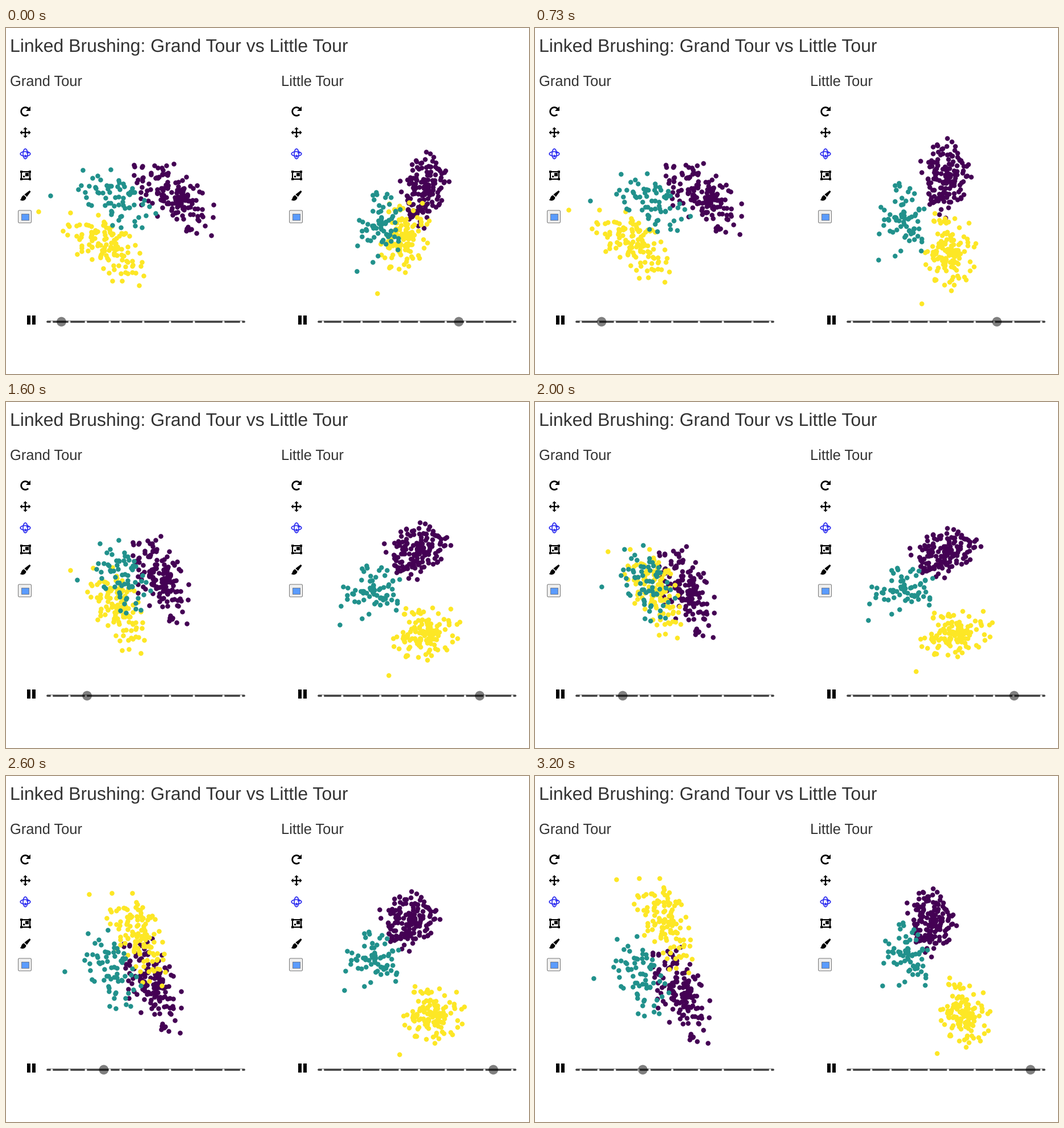
Write a matplotlib script that moves like this. It is 920x609 px and loops after 3270 ms.

```python
import numpy as np
import matplotlib.pyplot as plt
from matplotlib.animation import FuncAnimation
from matplotlib.patches import Circle, Ellipse, FancyBboxPatch, PathPatch, Polygon, Rectangle
from matplotlib.path import Path

W, H, DPI = 920, 609, 64
PX = 72 / DPI
LOOP, STEPS = 3270, 49
SHIFT = 477
TURN = np.radians(2.5)  # tour rotation per step

PURPLE, YELLOW, TEAL = "#440154", "#fde725", "#21918c"
COUNTS = {PURPLE: 151, YELLOW: 123, TEAL: 68}

# Tour stops: step, the three group centres, shared spread (x, y, correlation)
GRAND = [
    (0, [(293, 295), (178, 384), (193, 300)], (31, 27, .58)),
    (6, [(298, 292), (170, 381), (208, 308)], (32, 25, .58)),
    (24, [(268, 310), (200, 358), (205, 307)], (21, 33, .5)),
    (42, [(250, 377), (243, 260), (183, 349)], (23, 36, .53)),
    (48, [(256, 380), (227, 255), (186, 352)], (22, 36, .52)),
]
LITTLE = [
    (0, [(735, 284), (698, 368), (660, 346)], (18, 28, -.25)),
    (6, [(720, 268), (723, 387), (653, 337)], (17, 31, 0)),
    (28, [(721, 267), (735, 406), (650, 330)], (27, 18, -.3)),
    (48, [(695, 257), (753, 418), (657, 314)], (18, 25, .1)),
]
# One far outlier per group, in units of spread
GRAND_FAR = [(2.2, 1.6), (-3.9, 0), (-3.7, 2.4)]
LITTLE_FAR = [(.2, -2.4), (-2.5, 3), (-2.4, 2.4)]

plt.rcParams["text.hinting"] = "none"
fig = plt.figure(figsize=(W / DPI, H / DPI), dpi=DPI, facecolor="white")
ax = fig.add_axes([0, 0, 1, 1])
ax.set_xlim(0, W)
ax.set_ylim(H, 0)
ax.axis("off")
rng = np.random.default_rng(11)


class Tour:
    def __init__(self, stops):
        steps, centres, spreads = zip(*stops)
        self.steps = np.array(steps)
        self.centres = np.array(centres, float)
        self.spreads = np.array(spreads, float)
        self.pivot = self.centres.mean((0, 1))

    def at(self, step):
        """Group centres swing around the pivot, the spread changes evenly."""
        k = min(np.searchsorted(self.steps, step, side="right"), len(self.steps) - 1) - 1
        span = self.steps[k + 1] - self.steps[k]
        u = (step - self.steps[k]) / span
        arc = TURN * span
        a, b = np.sin([(1 - u) * arc, u * arc]) / np.sin(arc)
        p, q = self.centres[k:k + 2] - self.pivot
        spread = (1 - u) * self.spreads[k] + u * self.spreads[k + 1]
        return self.pivot + a * p + b * q, spread


def cloud(n, far):
    z = rng.normal(size=(n - 1, 2))
    z[np.hypot(*z.T) > 2.5] *= .7
    return np.vstack([(z - z.mean(0)) / z.std(0), far])


def label(x, y, text, size):
    ax.text(x, y, text, family="Liberation Sans", size=size * PX, color="#333333",
            ha="left", va="baseline")


def fill(points, color="black"):
    ax.add_patch(Polygon(points, fc=color, ec="none", zorder=5))


def box(x, y, w, h, fc="black", ec="none", lw=0, z=5):
    ax.add_patch(Rectangle((x, y), w, h, fc=fc, ec=ec, lw=lw * PX, zorder=z))


def stroke(x, y, lw, color="black", **kw):
    ax.plot(x, y, color=color, lw=lw * PX, zorder=5, **kw)


def redo_icon(x, y):
    a = np.radians(np.linspace(-40, -315, 50))
    stroke(x + 7.3 * np.cos(a), y + 7.3 * np.sin(a), 2.8, solid_capstyle="butt")
    fill([(x + 9, y - 9), (x + 9, y - 1), (x + 1, y - 1)])


def move_icon(x, y):
    for dx, dy in ((1, 0), (-1, 0), (0, 1), (0, -1)):
        stroke([x, x + 7 * dx], [y, y + 7 * dy], 2.3)
        fill([(x + 9.5 * dx, y + 9.5 * dy),
              (x + 5.7 * dx + 3.8 * dy, y + 5.7 * dy + 3.8 * dx),
              (x + 5.7 * dx - 3.8 * dy, y + 5.7 * dy - 3.8 * dx)])


def orbit_icon(x, y):
    blue = "#2d2df0"
    for w, h in ((17.5, 8), (8, 17.5)):
        ax.add_patch(Ellipse((x, y), w, h, fc="none", ec=blue, lw=1.7 * PX, zorder=5))
    fill([(x - 1, y + 1), (x - 1, y + 7), (x + 3, y + 4)], blue)
    fill([(x + 1, y - 1), (x + 7, y - 1), (x + 4, y - 5)], blue)


def frame_icon(x, y):
    box(x - 7.5, y - 6.5, 15, 13, "none", "black", 2.2)
    for dx in (-7.5, 7.5):
        for dy in (-6.5, 6.5):
            box(x + dx - 2, y + dy - 2, 4, 4)
    box(x - .5, y - 4, 6, 5.5)
    box(x - 4.5, y + 1, 3, 3)


def brush_icon(x, y):
    fill([(x + 7.5, y - 9), (x + 9.5, y - 7), (x + 2.7, y + 2.2), (x - 1.7, y - 2)])
    c = Path.CURVE4
    pts = [(-2.5, -.8), (1.5, 3.2), (1, 8.5), (-5, 10.5), (-9.5, 7.5),
           (-6.5, 7), (-8, 1), (-2.5, -.8)]
    path = Path([(x + a, y + b) for a, b in pts],
                [Path.MOVETO, Path.LINETO, c, c, c, c, c, c])
    ax.add_patch(PathPatch(path, fc="black", ec="none", zorder=5))


def swatch(x, y):
    ax.add_patch(FancyBboxPatch((x - 11.5, y - 11), 23, 22, fc="#efefef", ec="#767676",
                                boxstyle="round,pad=0,rounding_size=2", lw=PX, zorder=5))
    box(x - 6.5, y - 5.5, 13, 11, "#5a9bff", "#6f7c90", 1, 6)


class Panel:
    def __init__(self, x, title, stops, far, ticks, start, speed):
        label(x + 7, 103, title, 25.5)
        redo_icon(x + 34, 147)
        move_icon(x + 34, 184)
        orbit_icon(x + 34, 221.5)
        frame_icon(x + 34, 259)
        brush_icon(x + 34, 295)
        swatch(x + 33, 332)
        for bar in (36.5, 46):
            box(x + bar, 506, 6.3, 15.5)

        stroke([x + 73, x + 419], [517.3, 517.3], 3.7, "#444444", solid_capstyle="round")
        ax.plot(x + np.array(ticks), [517.3] * len(ticks), "o", color="white",
                ms=4 * PX, mew=0, zorder=6)
        self.start, self.speed = x + start, speed
        self.knob = ax.add_patch(Circle((0, 517), 8.4, fc="black", ec="none",
                                        alpha=.5, zorder=7))
        self.tour = Tour(stops)
        self.groups = []
        for z, ((color, n), lone) in enumerate(zip(COUNTS.items(), far)):
            dots, = ax.plot([], [], "o", color=color, ms=8.5 * PX, mew=0, zorder=2 + z * .1)
            self.groups.append((dots, cloud(n, lone)))

    def update(self, step):
        self.knob.center = self.start + self.speed * step, 517
        centres, (sx, sy, r) = self.tour.at(step)
        for (dots, z), (cx, cy) in zip(self.groups, centres):
            dots.set_data(cx + sx * z[:, 0],
                          cy + sy * (r * z[:, 0] + np.sqrt(1 - r * r) * z[:, 1]))


label(7, 41, "Linked Brushing: Grand Tour vs Little Tour", 32)
panels = [
    Panel(0, "Grand Tour", GRAND, GRAND_FAR,
          [80, 110.5, 140, 182, 201, 241, 288, 330, 382, 413], 97.5, 1.96),
    Panel(SHIFT, "Little Tour", LITTLE, LITTLE_FAR,
          [80, 114, 148, 181, 215, 249, 296, 330, 364, 413], 319.5, 1.6),
]


def draw(step):
    for panel in panels:
        panel.update(step)
    return []


anim = FuncAnimation(fig, draw, frames=STEPS, interval=LOOP / STEPS, repeat=True, repeat_delay=0)
plt.show()
```
